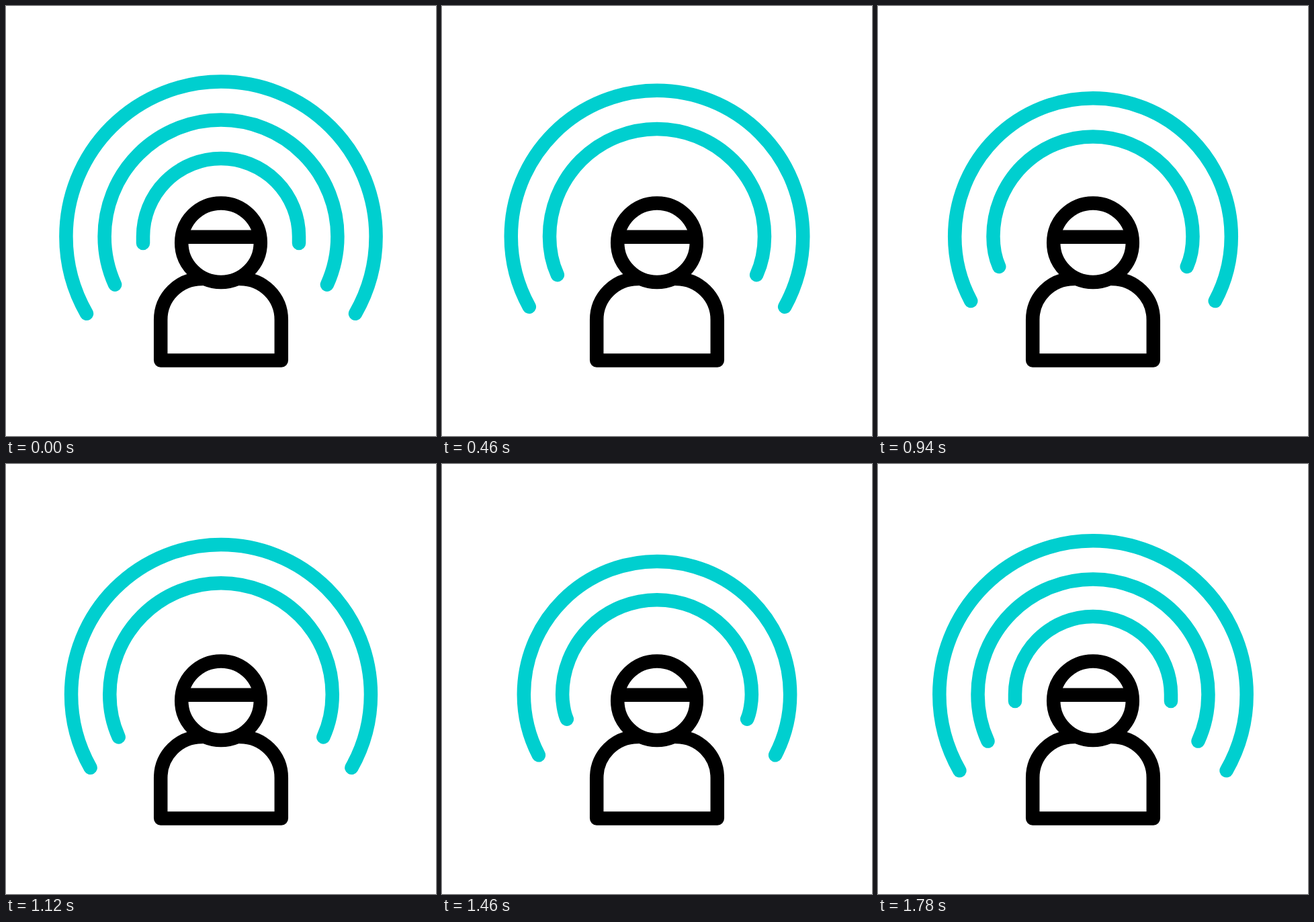
Write an HTML page that moves like this. It is 640x640 px and loops after 1.8 s.

```html
<!DOCTYPE html>
<html lang="en">
<head>
<meta charset="utf-8">
<title>Broadcast person</title>
<style>
  html, body { margin: 0; width: 100%; height: 100%; overflow: hidden; background: #fff; }
  svg { display: block; width: 100%; height: 100%; }
</style>
</head>
<body>
<svg viewBox="0 0 640 640" fill="none" stroke-width="20.5" stroke-linecap="round" stroke-linejoin="round">
  <g id="waves" stroke="#00cfcf">
    <path/>
    <path/>
    <path/>
  </g>
  <g stroke="#000">
    <circle cx="320" cy="352.2" r="58.8"/>
    <path d="M264 343.8H376" stroke-linecap="butt"/>
    <path d="M291.3 406A61.1 61 0 0 0 230.2 467V527.4H409.8V467A61.1 61 0 0 0 348.7 406"/>
  </g>
</svg>
<script>
const CX = 320, CY = 343, PERIOD = 600, STEP = 20;
const waves = document.querySelectorAll('#waves path');

// A half circle plus a tail; the tail is an offset from the centre, mirrored on both sides.
function arcStage(r, degrees) {
  const a = degrees * Math.PI / 180;
  const h = 4 / 3 * Math.tan(a / 4) * r;
  const x = r * Math.cos(a), y = r * Math.sin(a);
  return [r, r, h, x + h * Math.sin(a), y - h * Math.cos(a), x, y];
}

const stages = [
  [116, 116, 0, 116, 10, 116, 10], // the smallest wave has straight tails
  arcStage(173.4, 24.4),
  arcStage(230.6, 29.85)
];

function wavePath(position) {
  const i = Math.min(Math.floor(position), stages.length - 2);
  const f = position - i;
  const [r, x1, y1, x2, y2, x3, y3] = stages[i].map((v, k) => v + (stages[i + 1][k] - v) * f);
  const at = (side, x, y) => `${CX + side * x} ${CY + y}`;
  return `M${at(-1, x3, y3)}C${at(-1, x2, y2)} ${at(-1, x1, y1)} ${at(-1, r, 0)}` +
    `A${r} ${r} 0 0 1 ${at(1, r, 0)}` +
    `C${at(1, x1, y1)} ${at(1, x2, y2)} ${at(1, x3, y3)}`;
}

function draw(ms) {
  const t = Math.floor(ms / STEP) * STEP % PERIOD || PERIOD;
  const p = t / PERIOD;
  waves[0].setAttribute('d', wavePath(p));
  waves[1].setAttribute('d', wavePath(1 + p));
  // The next wave shows briefly at rest before it starts to grow.
  waves[2].setAttribute('d', t >= PERIOD - STEP ? wavePath(0) : '');
}

const start = performance.now();
function tick() {
  draw(performance.now() - start);
  requestAnimationFrame(tick);
}
tick();
</script>
</body>
</html>
```
